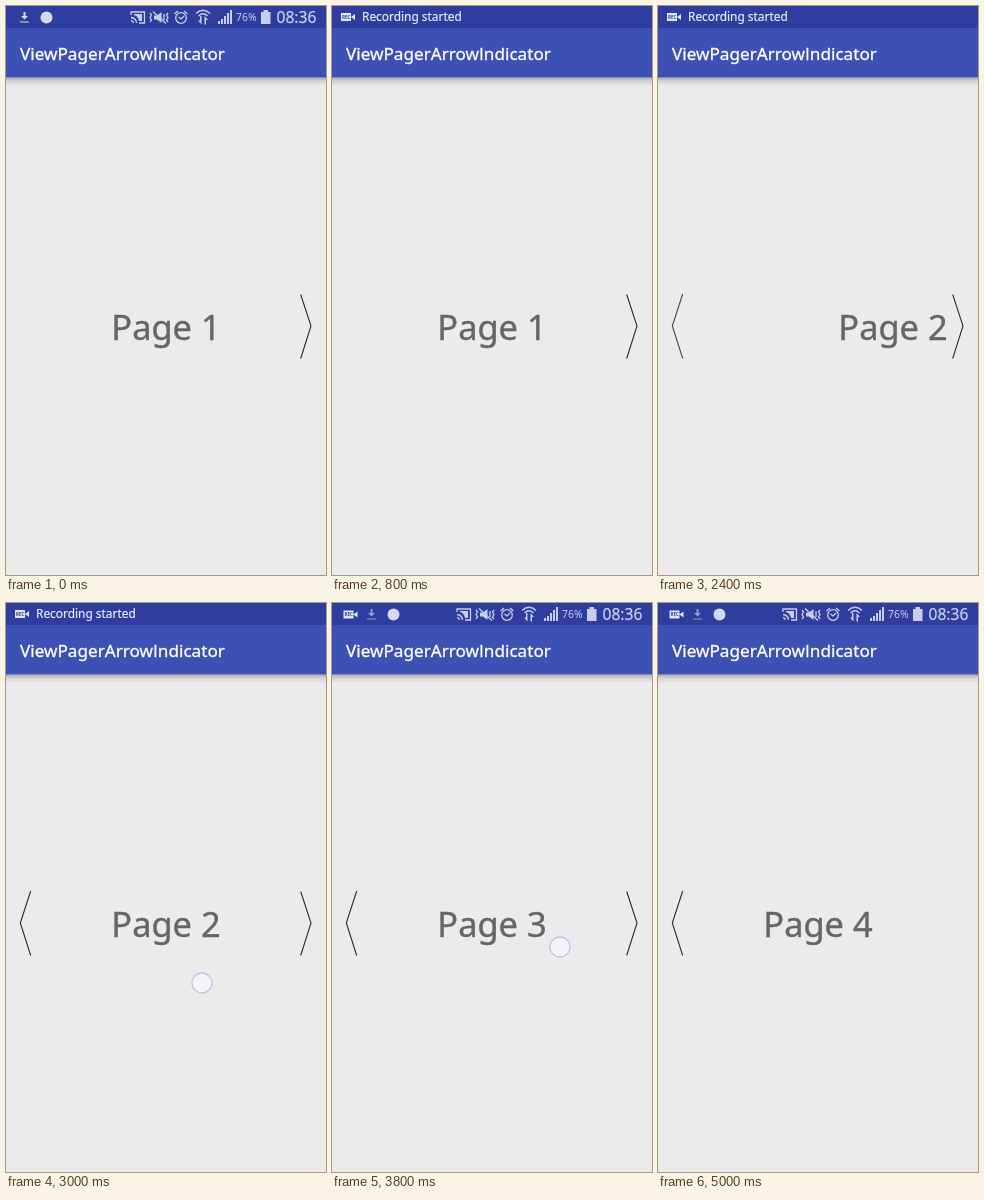
Recreate the animation shown at these times as an HTML page. Size 320 px wide and 569 px high, loop 5100 ms.

```html
<!DOCTYPE html>
<html lang="en">
<head>
<meta charset="utf-8">
<title>ViewPagerArrowIndicator</title>
<style>
  html, body { margin: 0; width: 100%; height: 100%; overflow: hidden; background: #ebebeb; }
  svg { display: block; width: 100%; height: 100%; font-family: "Noto Sans", "Open Sans", sans-serif; }
  .line { fill: none; stroke: #c9cdea; stroke-width: 1.3; }
  .solid { fill: #c9cdea; }
  .arrow { fill: none; stroke: #2b2b2b; stroke-width: 1.1; }
  .page { font-size: 34.4px; fill: #666; stroke: #666; stroke-width: .4; text-anchor: middle; }
  .title { font-size: 17.15px; fill: #fff; stroke: #fff; stroke-width: .3; }
</style>
</head>
<body>
<svg viewBox="0 0 320 569">
  <defs>
    <linearGradient id="shade" x2="0" y2="1">
      <stop offset="0" stop-color="#000" stop-opacity=".28"/>
      <stop offset=".4" stop-color="#000" stop-opacity=".11"/>
      <stop offset="1" stop-color="#000" stop-opacity="0"/>
    </linearGradient>
    <clipPath id="barClip"><path d="M0 0H320V22H0Z"/></clipPath>
    <g id="camera">
      <path fill="#e4e6f5" d="M0 0H10V8H0ZM10 4L14 1V7Z"/>
      <text x="1" y="5.8" font-size="4.5" font-weight="700" fill="#303f9f">REC</text>
    </g>
  </defs>

  <path fill="#ebebeb" d="M0 0H320V569H0Z"/>
  <g id="pages"></g>
  <path id="left" class="arrow" d="M24.7 288L14.3 320L24.7 352.5"/>
  <path id="right" class="arrow" d="M294.7 288.5L305 320L294.7 352.5"/>

  <path fill="url(#shade)" d="M0 71.500H320V80H0Z"/>
  <path fill="#3d50b4" d="M0 22H320V71.500H0Z"/>
  <text class="title" x="14" y="53.800">ViewPagerArrow<tspan font-family="Open Sans, sans-serif">I</tspan>ndicator</text>

  <path id="barBack" d="M0 0H320V22H0Z"/>
  <g clip-path="url(#barClip)">
    <g id="status">
      <use id="rec" href="#camera" x="11.5" y="7.5"/>
      <g id="notices">
        <path id="download" fill="#d5d8ee" d="M17.500 6H19.500V10H22L18.500 13.500L15 10H17.500ZM14 15.500H23V16.500H14Z"/>
        <circle cx="40.5" cy="11.5" r="6" fill="#d5d8ee"/>
      </g>
      <!-- cast -->
      <path class="line" d="M125 9V6H138.500V17H133M125 11.500A6 6 0 0 1 130.500 17M125 14.500A3 3 0 0 1 127.500 17"/>
      <path class="solid" d="M128 8H136V15H133Q132 10 128 9Z"/>
      <!-- muted, vibrating -->
      <path class="solid" d="M148 9.500H151L155.500 6V17L151 13.500H148Z"/>
      <path class="line" d="M147 5.500L160 17.500M144 7L145.500 9L144 11.500L145.500 14L144 16M162 7L160.500 9L162 11.500L160.500 14L162 16M158 8V14"/>
      <!-- alarm -->
      <circle class="line" cx="175" cy="12" r="5.300"/>
      <path class="line" d="M172.500 11L175 13L178 10M168.500 8L172 5M181.500 8L178 5"/>
      <!-- wireless -->
      <path class="line" stroke-width="1.600" d="M190 7.500Q197 1 204 7.500M192.500 10Q197 5.500 201.500 10"/>
      <path class="solid" d="M195.500 10V18.500L192 14.500H194V10ZM198.500 18.500V10L202 14H200V18.500Z"/>
      <!-- signal -->
      <path class="solid" d="M212 15H214V18H212ZM215 13H217V18H215ZM218 10H220V18H218ZM221 7H223V18H221ZM224 4H226V18H224Z"/>
      <text class="solid" x="230" y="15.300" font-size="10.400">76%</text>
      <path class="solid" d="M257.500 4H262V6H264.500V18H255V6H257.500Z"/>
      <text class="solid" x="270.500" y="17" font-size="15.600" stroke="#c9cdea" stroke-width=".25">08:36</text>
    </g>
    <g id="ticker">
      <use href="#camera" x="9" y="7"/>
      <text x="30" y="15.300" font-size="11.900" fill="#e8eaf8" stroke="#e8eaf8" stroke-width=".2">Recording started</text>
    </g>
  </g>
  <circle id="touch" r="10" fill="#f3f3f8" stroke="#c4c4e6" stroke-width="1.3"/>
</svg>
<script>
const LOOP = 5100, STEP = 100, WIDTH = 320;
const $ = id => document.getElementById(id);
const clamp = v => Math.max(0, Math.min(1, v));
const place = (el, x, y) => el.setAttribute("transform", `translate(${x} ${y})`);

// Each swipe: start time, page offset per step, finger path per step
const swipes = [
  { at: 2200, shift: [3, 85, 245, 305, 320], finger: [[124, 382], [42, 383]] },
  { at: 3000, shift: [0, 90, 255, 310, 320], finger: [[196, 380], [106, 381]] },
  { at: 3800, shift: [0, 88, 240, 295, 308, 315, 318, 319.5, 320], finger: [[228, 344], [140, 350], [60, 353]] }
];

$("pages").innerHTML = [1, 2, 3, 4].map((n, i) =>
  `<text class="page" x="${160 + i * WIDTH}" y="334.4">Page ${n}</text>`).join("");

function draw(t) {
  let scroll = 0, finger = null;
  for (const { at, shift, finger: path } of swipes) {
    const i = (t - at) / STEP;
    if (i < 0) continue;
    scroll += shift[Math.min(i, shift.length - 1)];
    finger = path[i];
  }
  place($("pages"), -scroll, 0);
  const page = scroll / WIDTH;
  $("left").style.opacity = clamp(page * 1.1);
  $("right").style.opacity = clamp(1 - (page - 2) * 1.1);
  $("touch").style.display = finger ? "" : "none";
  if (finger) place($("touch"), ...finger);

  // The ticker pushes the status icons up, then drops away again
  const leaving = t >= 3200;
  const shown = leaving ? clamp((3600 - t) / 400) : clamp((t - 150) / 450);
  place($("status"), 0, -22 * shown);
  $("status").style.opacity = 1 - shown;
  place($("ticker"), 0, 22 * (1 - shown));
  $("ticker").style.opacity = Math.sqrt(shown);
  $("barBack").style.fill = shown > 0 && shown < 1 ? "#3a48ac" : "#2f3d9e";

  $("rec").style.display = leaving ? "" : "none";
  place($("notices"), leaving ? 21 : 0, 0);
  $("download").style.opacity = leaving ? 0.6 : 1;
}

const start = performance.now();
function frame() {
  const t = (performance.now() - start) % LOOP;
  draw(Math.floor(t / STEP) * STEP);
  requestAnimationFrame(frame);
}
frame();
</script>
</body>
</html>
```
